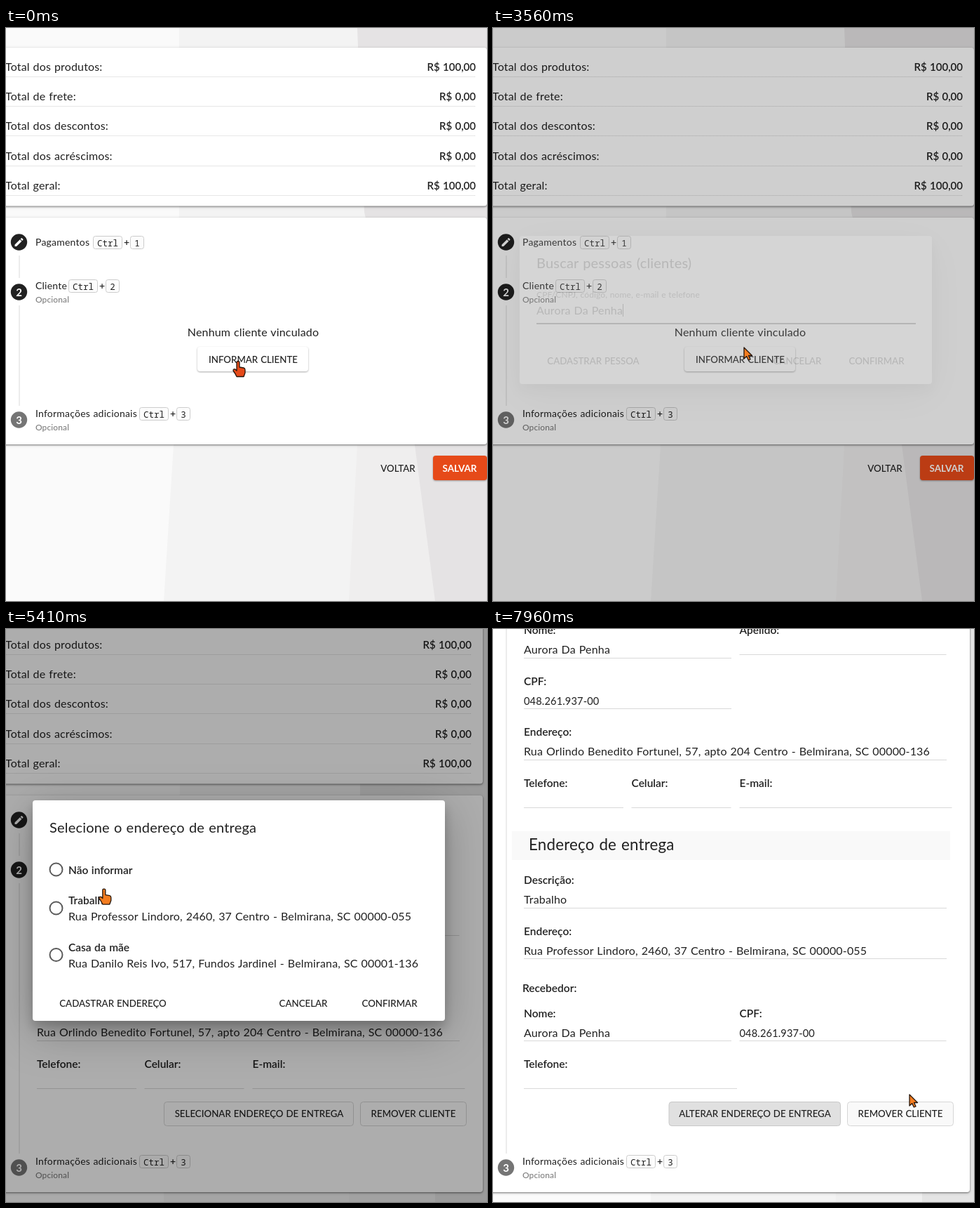
Animation of 686x816 px, one loop 8000 ms. Source, as an HTML page:

```html
<!DOCTYPE html>
<html lang="pt-BR">
<head>
<meta charset="utf-8">
<title>Vincular cliente</title>
<style>
  html, body { margin: 0; height: 100%; overflow: hidden; }
  #stage { display: block; width: 100vw; height: 100vh; }
  text { font-family: Lato, "Open Sans", sans-serif; fill: #212121; letter-spacing: .01em; word-spacing: .04em; white-space: pre; }
  .bold { font-weight: 600; letter-spacing: 0; }
  .btn { font-size: 13.3px; font-weight: 500; letter-spacing: 0; text-anchor: middle; }
  .step { font-size: 14px; letter-spacing: .22px; }
  .hint { font-size: 12px; fill: #757575; }
  .mono { font: 12.5px "Noto Sans Mono", "DejaVu Sans Mono", monospace; text-anchor: middle; letter-spacing: 0; }
  .end { text-anchor: end; }
  .mid { text-anchor: middle; }
  .white { fill: #fff; font-weight: 700; }
  .card { fill: #fff; filter: drop-shadow(0 1px 1px #0007) drop-shadow(0 1px 2px #0002); }
  .raised { fill: #fff; filter: drop-shadow(0 1.5px 1px #0005); }
  .dialog { fill: #fff; filter: drop-shadow(0 9px 8px #0003) drop-shadow(0 14px 30px #0004); }
  .outline { fill: none; stroke: #d6d6d6; }
</style>
</head>
<body>
<svg id="stage" viewBox="0 0 686 816" preserveAspectRatio="none"></svg>
<script>
const LOOP = 8000;
const NAME = 'Aurora Da Penha', CPF = '048.261.937-00';
const HOME = 'Rua Orlindo Benedito Fortunel, 57, apto 204 Centro - Belmirana, SC 00000-136';
const WORK = 'Rua Professor Lindoro, 2460, 37 Centro - Belmirana, SC 00000-055';
const MOTHER = 'Rua Danilo Reis Ivo, 517, Fundos Jardinel - Belmirana, SC 00001-136';

// Markup helpers
const text = (x, y, s, size = 16, cls = '', extra = '') =>
  `<text x="${x}" y="${y}" font-size="${size}" class="${cls}" ${extra}>${s}</text>`;
const bold = (x, y, s, size = 15.5, cls = '') => text(x, y, s, size, 'bold ' + cls);
const rect = (x, y, w, h, extra = '') => `<rect x="${x}" y="${y}" width="${w}" height="${h}" ${extra}/>`;
const hline = (x, y, w, extra = 'stroke="#d9d9d9"') => `<path d="M${x} ${y}h${w}" ${extra}/>`;
const poly = (points, fill) => `<polygon points="${points}" fill="${fill}"/>`;
const group = (id, body, extra = '') => `<g id="${id}" ${extra}>${body}</g>`;
const ripple = (id, x, y, w, h, cx, cy) =>
  `<svg x="${x}" y="${y}" width="${w}" height="${h}"><circle id="${id}" cx="${cx - x}" cy="${cy - y}"/></svg>`;
const label = (x, y, s, extra = '') => text(x, y, s, 13.3, 'btn', extra);

function kbd(x, y, key) {
  const box = (bx, w, s) => rect(bx + .5, y - 13.5, w, 18, 'rx="3" fill="#fcfcfc" stroke="#ccc"') +
    text(bx + w / 2 + .5, y + .5, s, 12.5, 'mono');
  return box(x, 41, 'Ctrl') + bold(x + 48, y, '+', 14, 'mid') + box(x + 53, 19, key);
}

function step(y, title, keyX, key, badge, fill = '#212121') {
  const cy = y + (key > 1 ? 4 : -5);
  return `<circle cx="18.5" cy="${cy}" r="11.7" fill="${fill}"/>` +
    (badge || bold(18.5, cy + 5.5, key, 15, 'mid white')) +
    text(42, y, title, 14, 'step') + kbd(keyX, y, key) +
    (key > 1 ? text(42, y + 18.5, 'Opcional', 12, 'hint') : '');
}

const field = (x, y, w, title, value = '') => bold(x, y, title + ':') +
  (value && text(x, y + 28, value, /^\d/.test(value) ? 14.6 : 16)) +
  hline(x, Math.floor(y + (value ? 34 : 29)) + .5, w);

const PENCIL = `<path transform="translate(10.5 297) scale(.667)" fill="#fff"
  d="M3 17.25V21h3.75L17.81 9.94l-3.75-3.75zM20.71 7.04a1 1 0 0 0 0-1.41l-2.34-2.34a1 1 0 0 0-1.41 0l-1.83 1.83 3.75 3.75z"/>`;

function emptyClient() {
  return text(352.5, 439, 'Nenhum cliente vinculado', 16, 'mid') +
    rect(273, 454, 158, 35, 'rx="4" class="raised"') + ripple('openRipple', 273, 454, 158, 35, 331, 476) +
    label(352.5, 477, 'INFORMAR CLIENTE');
}

function clientCard(delivery) {
  const y = delivery ? 1106 : 706;
  const form = field(44, 440, 296, 'Nome', NAME) + field(351.5, 440, 295, 'Apelido') +
    field(44, 512.5, 296, 'CPF', CPF) + field(44, 585, 603, 'Endereço', HOME) +
    field(44, 658, 142, 'Telefone') + field(197.5, 658, 142, 'Celular') + field(351.5, 658, 303, 'E-mail');
  const address = rect(27, 721, 625, 41, 'fill="#f9f9f9"') + text(51, 748, 'Endereço de entrega', 22.3) +
    field(44, 796, 603, 'Descrição', 'Trabalho') + field(44, 868.5, 603, 'Endereço', WORK) +
    bold(42, 950, 'Recebedor:') + field(44, 985.5, 296, 'Nome', NAME) +
    field(351.5, 985.5, 295, 'CPF', CPF) + field(44, 1058, 304, 'Telefone');
  const main = delivery
    ? rect(251, y + .5, 244.5, 34, 'rx="4" fill="#e0e0e0" stroke="#c8c8c8"') + label(373.5, y + 22, 'ALTERAR ENDEREÇO DE ENTREGA')
    : rect(225.5, y + .5, 270, 34, 'id="pickHover" rx="4" fill="#f4f4f4"') + ripple('pickRipple', 226, y + 1, 269, 33, 398, y + 20) +
      rect(225.5, y + .5, 270, 34, 'rx="4" class="outline"') + label(361, y + 22, 'SELECIONAR ENDEREÇO DE ENTREGA');
  return form + (delivery ? address : '') + main +
    (delivery ? rect(505.5, y + .5, 151, 34, 'id="removeHover" rx="4" fill="#f9f9f9"') : '') +
    rect(505.5, y + .5, 151, 34, 'rx="4" class="outline"') + label(581, y + 22, 'REMOVER CLIENTE');
}

// variant 0: no client, 1: client, 2: client with delivery address
function page(variant) {
  const grow = [0, 242, 642][variant], width = variant ? 680 : 686;
  const totals = [['dos produtos', 100], ['de frete', 0], ['dos descontos', 0], ['dos acréscimos', 0], ['geral', 100]];
  const rows = totals.map(([name, value], i) => text(-1, 61 + 42.2 * i, `Total ${name}:`) +
    bold(width - 16, 61 + 42.2 * i, `R$ ${value},00`, 15, 'end') +
    hline(0, Math.round(69 + 42.2 * i) + .5, width - 16, 'stroke="#cfcfcf" stroke-dasharray="1 1"'));
  return group('page' + variant,
    rect(-10, 28, width + 10, 225.5, 'rx="4" class="card"') + rows.join('') +
    rect(-10, 270, width + 10, 323 + grow, 'rx="4" class="card"') +
    `<path d="M19 324V356M19 395V${538 + grow}" stroke="#d9d9d9"/>` +
    step(310, 'Pagamentos', 124, 1, PENCIL) + step(372, 'Cliente', 89, 2) +
    step(554 + grow, 'Informações adicionais', 190, 3, '', '#757575') +
    (variant ? clientCard(variant > 1) : emptyClient()) +
    label(559, 631.5 + grow, 'VOLTAR') +
    rect(609, 609 + grow, 77, 35, 'rx="4" class="raised" style="fill:#e64a19"') +
    bold(647, 632 + grow, 'SALVAR', 13.5, 'mid white'));
}

const backdrops = group('shortBack',
    poly('247,0 247,262 239,594 225,816 686,816 686,0', '#f3f3f3') +
    poly('501,594 489,816 686,816 686,594', '#efeeee') +
    poly('501,0 511,262 583,594 612,816 686,816 686,0', '#e5e3e4')) +
  group('tallBack',
    poly('248,0 248,500 225,800 225,816 686,816 686,0', '#f3f3f3') +
    poly('489,700 489,816 686,816 686,700', '#efefef') +
    poly('505,0 505,400 612,800 612,816 686,816 686,0', '#e4e4e4'));

const searchDialog = group('search',
  rect(38, 296, 588, 211, 'rx="4" class="dialog"') +
  text(62, 342, 'Buscar pessoas (clientes)', 20) +
  text(62, 408, 'CPF/CNPJ, código, nome, e-mail e telefone', 16, '', 'id="hint" style="fill:#444"') +
  text(62, 408, '', 16, '', 'id="typed"') + rect(62, 393, 1, 18, 'id="caret"') +
  hline(62, 420.5, 541, 'stroke="#8a8a8a"') + rect(62, 420, 541, 2, 'id="underline" fill="#111"') +
  label(143, 479, 'CADASTRAR PESSOA') + label(434, 479, 'CANCELAR') + label(547, 479, 'CONFIRMAR', 'id="confirmPerson"') +
  group('options', rect(62, 423, 541, 48, 'rx="4" class="raised"') +
    rect(62, 423, 541, 48, 'id="optionHover" fill="#f2f2f2"') + text(78, 452, NAME)));

const radio = (y, id = '') => `<circle cx="71.5" cy="${y}" r="9" fill="none" stroke="#5a5a5a" stroke-width="2" ${id}/>`;
const addressDialog = group('address',
  rect(38, 244, 588, 314, 'rx="4" class="dialog"') +
  text(62, 290, 'Selecione o endereço de entrega', 20) +
  radio(342.5) + bold(89, 348.5, 'Não informar') +
  ripple('radioRipple', 51, 377, 41, 41, 71.5, 397.5) + radio(397.5, 'id="workRing"') +
  '<circle id="workDot" cx="71.5" cy="397.5" r="5.5" fill="#dd6a2c"/>' +
  bold(89, 391.5, 'Trabalho') + text(89, 415, WORK) +
  radio(464) + bold(89, 458.5, 'Casa da mãe') + text(89, 482, MOTHER) +
  rect(492, 515, 111, 35, 'id="confirmHover" rx="4" fill="#0000000b"') + ripple('confirmRipple', 492, 515, 111, 35, 583, 530) +
  label(152.5, 537.5, 'CADASTRAR ENDEREÇO') + label(424, 537.5, 'CANCELAR') + label(547, 537.5, 'CONFIRMAR'));

const cursor = group('cursor',
  '<path id="arrow" d="M0 0V16L3.7 12.6 6.3 18 9 16.8 6.5 11.5H11.5Z"/>' +
  '<path id="hand" d="M-2 1.5Q-2-.5 0-.5T2 1.5V8L8 9Q10 9.5 10 12V16Q9 19 8 21.5H-2Q-4 17-7 13Q-7 10-4 11L-2 13Z"/>',
  'stroke="#26160c" stroke-width="1.3" stroke-linejoin="round"');

const $ = id => document.getElementById(id);
$('stage').innerHTML = rect(0, 0, 686, 816, 'fill="#fafafa"') + backdrops +
  group('scroller', page(0) + page(1) + page(2)) + rect(0, 0, 686, 816, 'id="shade"') +
  searchDialog + addressDialog + cursor;

// Timing helpers
const ramp = (t, start, length) => Math.min(1, Math.max(0, (t - start) / length));
const easeOut = p => 1 - (1 - p) ** 3;
const easeInOut = p => p < .5 ? 2 * p * p : 1 - 2 * (1 - p) ** 2;
const within = (t, spans) => spans.some(([a, b]) => t >= a && t < b);
const set = (id, attrs) => { for (const k in attrs) $(id).setAttribute(k, attrs[k]); };
const show = (id, on) => set(id, { display: on ? 'inline' : 'none' });

const SEARCH = { id: 'search', open: 180, close: 3496, cy: 401.5 };
const ADDRESS = { id: 'address', open: 4935, close: 6714, cy: 401 };
const CLIENT_SET = 3620, ADDRESS_SET = 6840, PICKED = 3050, RADIO = 6000;
const KEYS = [1230, 1400, 1480, 1560, 1640, 1800];
const HAND = [[0, 190], [2700, 3340], [5400, 6080], [6300, 6800]];
const PATH = [[30, 331, 475], [500, 336, 462], [2560, 336, 462], [2900, 356, 449], [3300, 358, 455], [3860, 358, 455],
  [4780, 398, 694], [4950, 398, 694], [5470, 133, 362], [5610, 132, 347], [5770, 132, 347], [5850, 117, 405],
  [6060, 117, 405], [6360, 583, 524], [6740, 583, 524], [7100, 541, 517], [7590, 541, 517], [7960, 594, 663]];

function pointer(t) {
  const i = PATH.findIndex(p => p[0] > t);
  if (i < 1) return PATH[i < 0 ? PATH.length - 1 : 0].slice(1);
  const [t0, x0, y0] = PATH[i - 1], [t1, x1, y1] = PATH[i];
  const p = easeInOut(ramp(t, t0, t1 - t0));
  return [x0 + (x1 - x0) * p, y0 + (y1 - y0) * p];
}

function drawDialog(t, { id, open, close, cy }) {
  const p = easeOut(ramp(t, open, 150)), s = .8 + .2 * p;
  set(id, { opacity: p * (1 - ramp(t, close, 75)), transform: `translate(332 ${cy}) scale(${s}) translate(-332 ${-cy})` });
  return easeOut(ramp(t, open, 400)) * (1 - easeOut(ramp(t, close, 400)));
}

function drawRipple(t, id, start, radius) {
  set(id, { r: radius * easeOut(ramp(t, start, 225)), opacity: .09 * (1 - ramp(t, start + 350, 250)) });
}

function drawSearch(t) {
  const focus = easeOut(ramp(t, 600, 400)), line = easeOut(ramp(t, 580, 240));
  set('hint', { y: 408 - 24 * focus, 'font-size': 16 - 4 * focus });
  set('underline', { x: 332.5 - 270.5 * line, width: 541 * line });
  $('typed').textContent = t < PICKED ? 'aurora'.slice(0, KEYS.filter(k => k <= t).length) : NAME;
  set('caret', { x: 62 + Math.round($('typed').getComputedTextLength()) });
  show('caret', t >= 860);
  $('confirmPerson').style.fill = t < PICKED ? '#bdbdbd' : '#212121';
  const open = easeOut(ramp(t, 1900, 370));
  set('options', {
    opacity: open * (1 - ramp(t, PICKED, 100)),
    transform: `translate(0 423) scale(1 ${.8 + .2 * open}) translate(0 -423)`
  });
  show('optionHover', t > 2600);
}

function draw(t) {
  const variant = t < CLIENT_SET ? 0 : t < ADDRESS_SET ? 1 : 2;
  for (let i = 0; i < 3; i++) show('page' + i, i === variant);
  show('shortBack', !variant);
  show('tallBack', variant);
  const scroll = Math.round(33 * easeInOut(ramp(t, 3860, 250)) + 400 * easeInOut(ramp(t, 7118, 260)));
  set('scroller', { transform: `translate(0 ${-scroll})` });

  const searchShade = drawDialog(t, SEARCH) * (t < CLIENT_SET);
  set('shade', { opacity: .32 * Math.max(searchShade, drawDialog(t, ADDRESS)) });
  drawSearch(t);

  drawRipple(t, 'openRipple', 30, 105);
  drawRipple(t, 'pickRipple', 4835, 175);
  drawRipple(t, 'radioRipple', RADIO, 20);
  drawRipple(t, 'confirmRipple', 6630, 92);
  set('workRing', { stroke: t < RADIO ? '#5a5a5a' : '#dd6a2c' });
  set('workDot', { r: 5.5 * easeOut(ramp(t, RADIO, 120)) });
  show('pickHover', within(t, [[4700, 4980]]));
  show('confirmHover', t >= 6330);
  show('removeHover', t >= 7900);

  const hand = within(t, HAND);
  set('cursor', { transform: `translate(${pointer(t)})`, fill: t < 130 ? '#e64a19' : '#f47d20' });
  show('hand', hand);
  show('arrow', !hand);
}

const begin = performance.now();
function tick() {
  draw((performance.now() - begin) % LOOP);
  requestAnimationFrame(tick);
}
tick();
</script>
</body>
</html>
```
